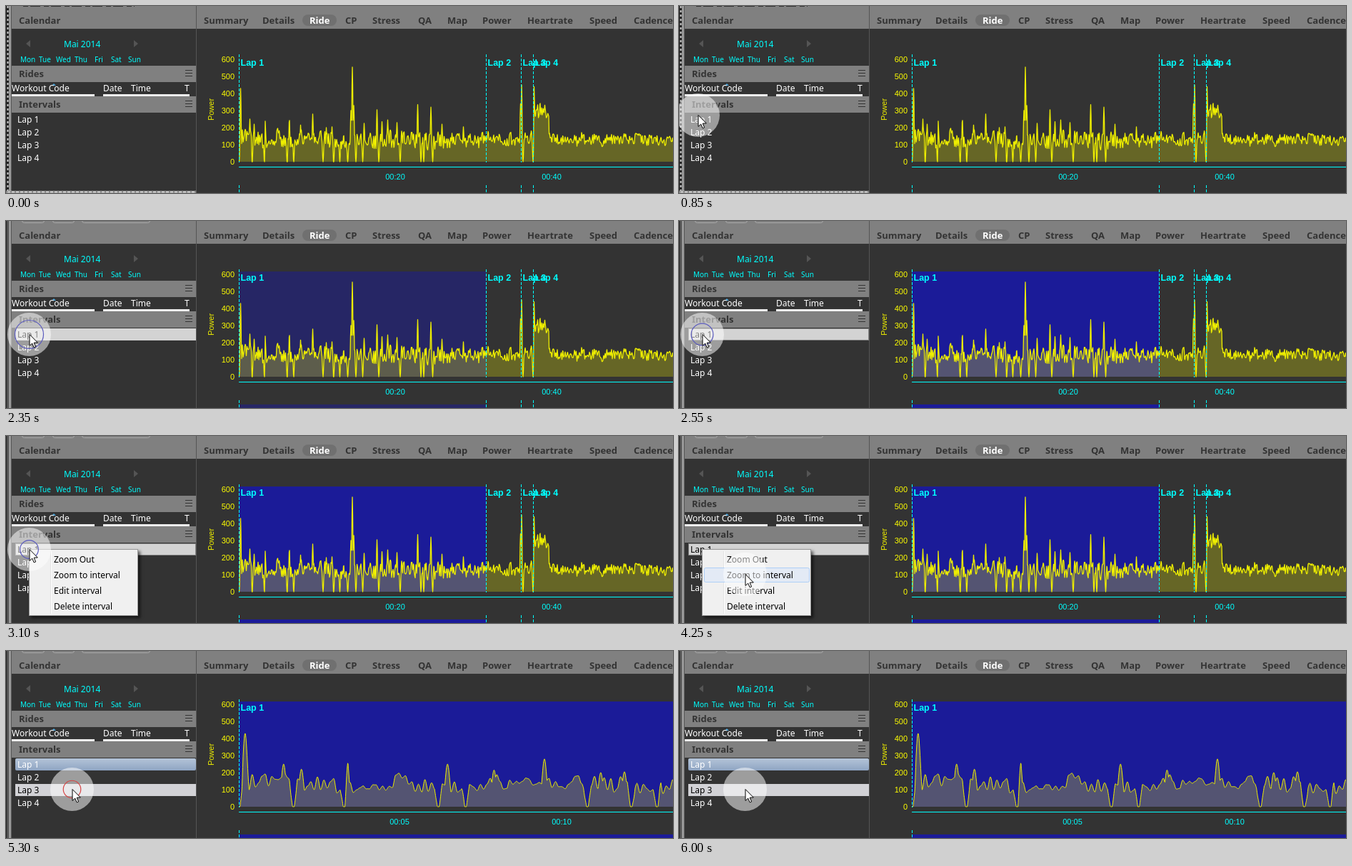
An HTML page with a canvas that plays this animation: 934 by 263 pixels, repeating every 8 s.

```html
<!DOCTYPE html>
<html lang="en">
<head>
<meta charset="utf-8">
<title>Zoom to interval</title>
<style>
html, body { margin: 0; width: 100%; height: 100%; overflow: hidden; background: #333; }
canvas { display: block; }
</style>
</head>
<body>
<canvas id="stage" width="934" height="263"></canvas>
<script>
const ctx = document.getElementById('stage').getContext('2d');
const LOOP = 8000, STEP = 50;
const UI = '12px "Noto Sans", sans-serif';
const BOLD = 'bold 13px "Noto Sans", sans-serif';
const AXIS = '11px "Liberation Sans", Arial, sans-serif';
const LABEL = 'bold 12.5px "Liberation Sans", Arial, sans-serif';
const CYAN = '#00ffff', YELLOW = '#eeee00', BAR = '#808080';

// Timeline in ms
const HOVER = 950, PRESS = 2350, SELECT = 2450, MENU = 2800;
const CHOOSE = 4900, CLOSE = 4950, ZOOM = 5200, RING = 1100;

// Pointer: time, x, y
const path = [[0, -40, 121], [50, -29, 121], [850, 26.5, 153.5], [1050, 32.5, 159.5], [3150, 32.5, 159.5],
  [3500, 35, 159.5], [3600, 35, 159.5], [3700, 37.5, 159.5], [3850, 37.5, 159.5], [4250, 92.5, 194.5]];

const X0 = 326, Y0 = 219;
const laps = [0, 346, 395, 412];
const peaks = [[2, 430], [15, 250], [21, 220], [36.2, 320], [70.3, 250], [86, 215], [103, 280], [122, 200],
  [130, 205], [156.5, 300], [158.5, 555], [160.5, 330], [175, 225], [193, 305], [200, 235], [208, 245], [221, 230],
  [250, 335], [268.5, 320], [284, 220], [314, 205], [394, 340], [395.5, 450], [413, 440]];
const dips = [0, 18.3, 35.4, 67.2, 76.4, 117.5, 132.3, 141, 152, 163.5, 173, 195.5, 225.5, 254.5, 258.5, 271, 397.5, 411.5];

function rect(x, y, w, h, color) {
  ctx.fillStyle = color;
  ctx.fillRect(x, y, w, h);
}

function text(str, x, y, color, font = UI, align = 'left') {
  ctx.font = font;
  ctx.fillStyle = color;
  ctx.textAlign = align;
  ctx.fillText(str, x, y);
}

function line(x1, y1, x2, y2, color, dash = [], width = 1) {
  ctx.strokeStyle = color;
  ctx.lineWidth = width;
  ctx.setLineDash(dash);
  ctx.beginPath();
  ctx.moveTo(x1, y1);
  ctx.lineTo(x2, y2);
  ctx.stroke();
  ctx.setLineDash([]);
}

function shape(points, color) {
  ctx.fillStyle = color;
  ctx.beginPath();
  points.forEach(([x, y]) => ctx.lineTo(x, y));
  ctx.closePath();
  ctx.fill();
}

function hash(n) {
  const s = Math.sin(n * 127.1 + 11.7) * 43758.5453;
  return (s - Math.floor(s)) * 2 - 1;
}

function noise(x) {
  const i = Math.floor(x), f = x - i, s = f * f * (3 - 2 * f);
  return hash(i) * (1 - s) + hash(i + 1) * s;
}

const bell = (x, c, w) => Math.exp(-(((x - c) / w) ** 2));

// Watts at a distance u along the unzoomed time axis
function power(u) {
  const rough = u < 300 ? 1 : u < 412 ? 0.75 : u < 434 ? 1 : 0.65;
  let w = 130 + rough * (50 * noise(u / 1.1) + 22 * noise(u / 4 + 90));
  if (u > 412 && u < 434) w += u < 428 ? 175 : 175 - (u - 428) * 15;
  for (const [c, h] of peaks) w = Math.max(w, h * bell(u, c, 1.1));
  for (const c of dips) w *= Math.min(1, Math.max(0, Math.abs(u - c) - 0.3));
  return Math.max(0, w);
}

function trace(scale) {
  const p = new Path2D();
  for (let x = 0; x <= 610; x += 0.5) p.lineTo(X0 + x + 0.5, Y0 - power(x / scale) * 0.24);
  return p;
}
const traces = { 1: trace(1), 4.15: trace(4.15) };

function chart(t) {
  const scale = t >= ZOOM ? 4.15 : 1;
  if (t >= HOVER) {
    const color = t >= SELECT ? '#1b1b98' : '#262665';
    const w = Math.min(laps[1] * scale, 608);
    rect(X0, 71, w, Y0 - 71, color);
    rect(X0, 258, w, 5, color);
  }
  const area = new Path2D(traces[scale]);
  area.lineTo(936, Y0);
  area.lineTo(X0, Y0);
  ctx.fillStyle = 'rgba(255,255,0,.25)';
  ctx.fill(area);
  ctx.strokeStyle = YELLOW;
  ctx.lineWidth = scale > 1 ? 1 : 1.3;
  ctx.lineJoin = 'round';
  ctx.stroke(traces[scale]);

  laps.forEach((u, i) => {
    const x = X0 + Math.round(u * scale) + 0.5;
    line(x, 68, x, 220, CYAN, [4, 2]);
    line(x, 252, x, 263, CYAN, [4, 2]);
    text('Lap ' + (i + 1), x + 2, 84, CYAN, LABEL);
  });
  line(X0, 226.5, 934, 226.5, CYAN);
  for (let w = 0; w <= 600; w += 100) text(w, 320, 223 - w * 0.24, '#ffff00', AXIS, 'right');
  const ticks = scale > 1 ? [['00:05', 551], ['00:10', 778]] : [['00:20', 545], ['00:40', 764]];
  for (const [s, x] of ticks) text(s, x, 244, CYAN, AXIS, 'center');
  ctx.save();
  ctx.translate(291, 145.5);
  ctx.rotate(-Math.PI / 2);
  text('Power', 0, 0, YELLOW, AXIS, 'center');
  ctx.restore();
}

function header(title, y, icon) {
  rect(8, y - 1, 258, 23, BAR);
  text(title, 18, y + 15, '#333', BOLD);
  if (icon) for (let i = 0; i < 3; i++) rect(251, y + 5 + i * 4, 10, 1, '#333');
}

function frame(t) {
  rect(0, 0, 934, 263, '#333');
  rect(8, 0, 926, 32, BAR);
  rect(0, 0, 8, 263, '#555');
  rect(0, 0, 1, 263, '#222');
  rect(4, 0, 3, 263, '#999');
  rect(266, 0, 1, 263, '#555');
  if (t < PRESS) {
    line(2.5, 0, 2.5, 263, '#222', [], 3);
    line(2.5, 0, 2.5, 263, '#ccc', [3, 3], 2);
    rect(0, 260, 266, 3, '#bbb');
    line(0, 261.5, 266, 261.5, '#444', [2, 4]);
    line(24, 0.5, 180, 0.5, '#333', [7, 3, 14, 5]);
  } else {
    ctx.strokeStyle = '#aaa';
    ctx.lineWidth = 1;
    for (const [x, w] of [[22, 31], [65, 30], [106, 95]]) {
      ctx.beginPath();
      ctx.roundRect(x + 0.5, -9.5, w, 12, 3);
      ctx.stroke();
    }
  }

  // Tabs
  ctx.fillStyle = '#707070';
  ctx.beginPath();
  ctx.roundRect(415, 12, 48, 16, 8);
  ctx.fill();
  const tabs = { Summary: 277, Details: 359, Ride: 425, CP: 475, Stress: 513, QA: 577, Map: 618,
    Power: 667, Heartrate: 730, Speed: 817, Cadence: 879 };
  for (const name in tabs) text(name, tabs[name], 25, name === 'Ride' ? '#fff' : '#333', BOLD);
}

function sidebar(t) {
  text('Calendar', 18, 25, '#333', BOLD);
  shape([[34, 48], [34, 58], [28, 53]], '#555');
  shape([[179, 48], [179, 58], [185, 53]], '#555');
  text('Mai 2014', 81, 58, CYAN);
  const days = { Mon: 20, Tue: 46, Wed: 70, Thu: 96, Fri: 124, Sat: 147, Sun: 171 };
  for (const d in days) text(d, days[d], 79, CYAN, '10px "Noto Sans", sans-serif');

  header('Rides', 85, true);
  rect(8, 124, 116, 3, '#eee');
  rect(136, 124, 121, 3, '#eee');
  shape([[64, 112], [70, 112], [67, 109]], '#4aa3d8');
  for (const [s, x] of [['Workout Code', 8], ['Date', 136], ['Time', 175], ['T', 250]]) text(s, x, 120, '#fff');

  header('Intervals', 128, true);
  const active = t >= HOVER && t < ZOOM;
  if (active) {
    rect(13, 151, 253, 17, '#d3d3d3');
    if (t >= SELECT) {
      ctx.strokeStyle = '#333';
      ctx.lineWidth = 1;
      ctx.setLineDash([1, 1]);
      ctx.strokeRect(13.5, 151.5, 252, 16);
      ctx.setLineDash([]);
    }
  }
  if (t >= ZOOM) {
    const g = ctx.createLinearGradient(0, 151, 0, 168);
    g.addColorStop(0, '#b4c4d8');
    g.addColorStop(1, '#8fa5c3');
    ctx.fillStyle = g;
    ctx.beginPath();
    ctx.roundRect(13, 151, 253, 17, 2);
    ctx.fill();
    rect(13, 187, 253, 17, '#d2d2d6');
  }
  for (let i = 0; i < 4; i++) {
    const dark = (i === 0 && active) || (i === 2 && t >= ZOOM);
    text('Lap ' + (i + 1), 16, 164 + i * 18, dark ? '#000' : '#fff');
  }
}

function menu(t, [px, py]) {
  if (t < MENU || t >= CLOSE) return;
  ctx.save();
  ctx.shadowColor = 'rgba(0,0,0,.6)';
  ctx.shadowBlur = 4;
  ctx.shadowOffsetX = ctx.shadowOffsetY = 3;
  rect(32, 159, 153, 94, '#979797');
  ctx.restore();
  rect(33, 160, 151, 92, '#f0f0f0');
  rect(62, 162, 1, 88, '#e2e2e2');
  rect(63, 162, 1, 88, '#fff');
  const items = ['Zoom Out', 'Zoom to interval', 'Edit interval', 'Delete interval'];
  items.forEach((s, i) => {
    const y = 163 + i * 22;
    if (px > 34 && py >= y && py < y + 22) {
      ctx.beginPath();
      ctx.roundRect(35.5, y + 0.5, 147, 20, 2);
      ctx.fillStyle = '#e3eaf5';
      ctx.fill();
      ctx.strokeStyle = '#aecff7';
      ctx.lineWidth = 1;
      ctx.stroke();
    }
    text(s, 67, y + 15, '#000');
  });
}

function pointerAt(t) {
  const i = path.findIndex(p => p[0] > t);
  if (i < 0) return path[path.length - 1].slice(1);
  const [t0, x0, y0] = path[i - 1], [t1, x1, y1] = path[i];
  let k = (t - t0) / (t1 - t0);
  if (t0 === 3850) k = k * k * (3 - 2 * k);
  return [x0 + (x1 - x0) * k, y0 + (y1 - y0) * k];
}

function ring(x, y, age, color) {
  if (age < 0 || age >= RING) return;
  ctx.beginPath();
  ctx.arc(x, y, 20 - 8.5 * Math.sin(Math.PI * age / RING), 0, 7);
  ctx.strokeStyle = color;
  ctx.lineWidth = 1.2;
  ctx.stroke();
}

function pointer(t, [x, y]) {
  if (t < 50) return;
  ctx.fillStyle = 'rgba(255,255,255,.52)';
  ctx.beginPath();
  ctx.arc(x, y, 30.5, 0, 7);
  ctx.fill();
  ring(x, y, t - PRESS, '#5a5abe');
  ring(x, y, t - CHOOSE, '#d64545');
  const arrow = [[0, 0], [0, 16], [3.7, 12.6], [6.2, 18.4], [8.6, 17.4], [6.2, 11.7], [11.3, 11.5]];
  shape(arrow.map(([dx, dy]) => [x + dx + 0.5, y + dy]), '#fff');
  ctx.strokeStyle = '#000';
  ctx.lineWidth = 1;
  ctx.stroke();
}

function draw() {
  const t = Math.floor((performance.now() % LOOP) / STEP) * STEP;
  const at = pointerAt(t);
  frame(t);
  chart(t);
  sidebar(t);
  menu(t, at);
  pointer(t, at);
  requestAnimationFrame(draw);
}
draw();
</script>
</body>
</html>
```
